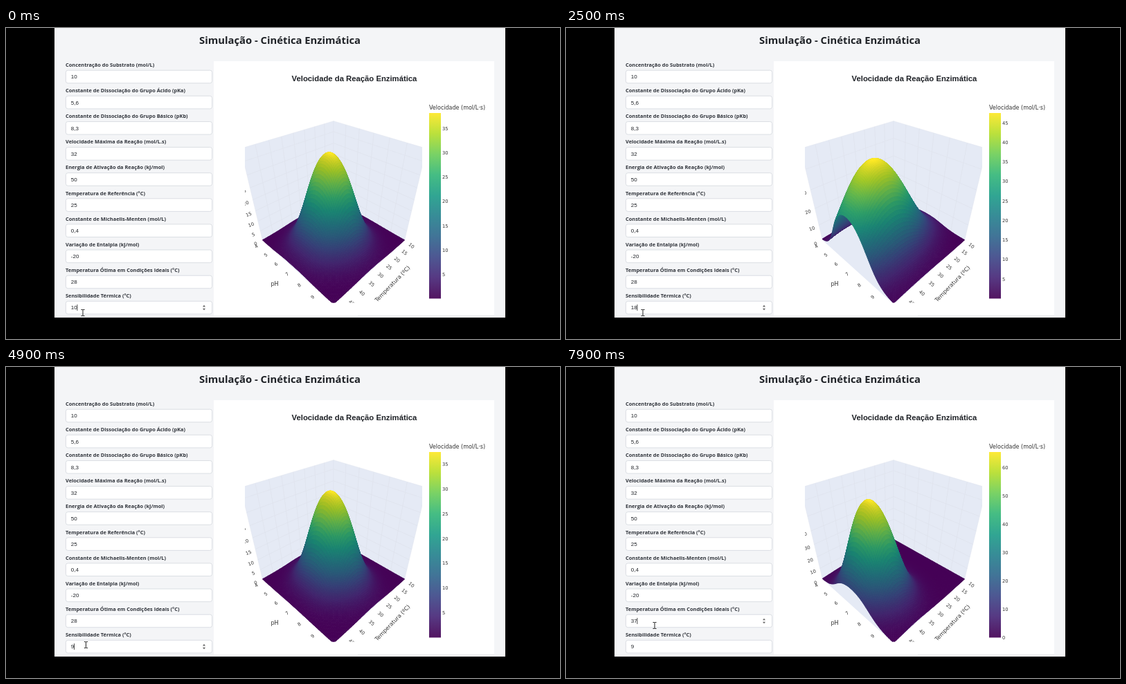
Write an HTML page with a canvas that moves like this. It is 800 by 450 pixels and loops after 8 s.

```html
<!DOCTYPE html>
<html lang="pt">
<head>
<meta charset="utf-8">
<style>
  html, body { margin: 0; width: 100%; height: 100%; overflow: hidden; background: #000; }
  canvas, body > svg { position: absolute; left: 0; top: 0; }
  text { fill: #1f2227; }
  .head { font: bold 14.8px "Open Sans", sans-serif; }
  .label { font: bold 7.4px "Open Sans", sans-serif; fill: #30343b; }
  .value { font: 8px "Liberation Sans", Arial, sans-serif; }
  .title { font: bold 11.3px "Liberation Sans", Arial, sans-serif; }
  .axis { font: 8px "DejaVu Sans", Verdana, sans-serif; fill: #333; }
  .tick { font: 6.7px "DejaVu Sans", Verdana, sans-serif; fill: #333; }
  .mid { text-anchor: middle; }
</style>
</head>
<body>
<canvas id="plot" width="800" height="450"></canvas>
<svg width="800" height="450" viewBox="0 0 800 450">
  <text class="head mid" x="395.5" y="22.5">Simulação - Cinética Enzimática</text>
  <text class="title mid" x="503" y="76.5">Velocidade da Reação Enzimática</text>
  <text class="axis" x="611" y="117.7">Velocidade (mol/L·s)</text>
  <g id="form"></g>
  <g id="barTicks"></g>
  <svg x="345" y="100" width="256" height="297.5" viewBox="345 100 256 297.5">
    <g id="axisTicks"></g>
    <text class="axis mid" x="388" y="373">pH</text>
    <text class="axis mid" transform="translate(560 372) rotate(-46)">Temperatura (ºC)</text>
  </svg>
  <g id="spin" fill="#666"><path d="M284 -1.2l2 -2.6 2 2.6zM284 1.2l2 2.6 2 -2.6z"/></g>
  <path id="caret" stroke="#222" stroke-width=".8" d="M0 -4.5v9"/>
  <path id="pointer" stroke="#222" fill="none" d="M-2.5 -4.5h2l.5 .5 .5 -.5h2M0 -4v8M-2.5 4.5h2l.5 -.5 .5 .5h2"/>
</svg>
<script>
const LOOP = 8000, LAG = 100, N = 90;
const $ = id => document.getElementById(id);
const ctx = $('plot').getContext('2d');
const fields = [
  ['Concentração do Substrato (mol/L)', '10'],
  ['Constante de Dissociação do Grupo Ácido (pKa)', '5,6'],
  ['Constante de Dissociação do Grupo Básico (pKb)', '8,3'],
  ['Velocidade Máxima da Reação (mol/L.s)', '32'],
  ['Energia de Ativação da Reação (kJ/mol)', '50'],
  ['Temperatura de Referência (°C)', '25'],
  ['Constante de Michaelis-Menten (mol/L)', '0,4'],
  ['Variação de Entalpia (kJ/mol)', '-20'],
  ['Temperatura Ótima em Condições Ideais (°C)', '28'],
  ['Sensibilidade Térmica (°C)', '10']
];
const rowY = i => 70.5 + 37.12 * i;
const clamp = (v, a, b) => Math.min(b, Math.max(a, v));
const steps = (t, start, every, count) => clamp(Math.floor((t - start) / every) + 1, 0, count);
const optimum = t => 28 + steps(t, 5950, 187, 9);
const spread = t => 10 + steps(t, 200, 300, 8) - steps(t, 2800, 150, 9);

// Enzyme rate: Arrhenius, thermal bell, Michaelis-Menten and pH ionisation
function rate(pH, temp, opt, width) {
  const inv = 1 / 298.15 - 1 / (temp + 273.15);
  const km = 0.4 * Math.exp(20000 / 8.314 * inv);
  return 32 * Math.exp(50000 / 8.314 * inv - ((temp - opt) / width) ** 2)
    * 10 / (km + 10) / (1 + 10 ** (5.6 - pH) + 10 ** (pH - 8.3));
}

// Perspective view of the unit cube along its diagonal
function project(a, b, z) {
  const depth = 2.165 - (a + b + z) / Math.sqrt(3);
  return [473 + 356 * (a - b) / Math.SQRT2 / depth,
          249.5 - 345 * (2 * z - a - b) / Math.sqrt(6) / depth];
}
const atPH = p => (p - 4) / 6 - 0.5;
const atTemp = t => (t - 10) / 40 - 0.5;
const atRate = f => 0.97 * f - 0.5;

const viridis = ['440154', '482878', '3e4989', '31688e', '26828e', '1f9e89', '35b779', '6ece58', 'b5de2b', 'fde725']
  .map(h => [0, 2, 4].map(i => parseInt(h.slice(i, i + 2), 16)));
function colour(f, light = 1) {
  const x = clamp(f, 0, 1) * 9, i = Math.min(8, Math.floor(x));
  return `rgb(${viridis[i].map((c, k) => Math.round(light * (c + (viridis[i + 1][k] - c) * (x - i))))})`;
}

function shape(points, fill, stroke) {
  ctx.beginPath();
  points.forEach(p => ctx.lineTo(...p));
  ctx.closePath();
  if (fill) { ctx.fillStyle = fill; ctx.fill(); }
  if (stroke) { ctx.strokeStyle = stroke; ctx.stroke(); }
}
function box(x, y, w, h, fill) { ctx.fillStyle = fill; ctx.fillRect(x, y, w, h); }

function drawWalls(max, zStep) {
  const h = 0.5, P = project;
  const line = (p, q) => shape([p, q], null, '#dfe2ec');
  ctx.lineWidth = 0.5;
  shape([P(-h, h, -h), P(-h, h, h), P(-h, -h, h), P(-h, -h, -h)], '#e5eaf5', '#dfe2ec');
  shape([P(h, -h, -h), P(h, -h, h), P(-h, -h, h), P(-h, -h, -h)], '#e5eaf5', '#dfe2ec');
  shape([P(-h, -h, -h), P(h, -h, -h), P(h, h, -h), P(-h, h, -h)], '#e5eaf5');
  for (let p = 5; p < 10; p++) line(P(atPH(p), -h, -h), P(atPH(p), -h, h));
  for (let t = 15; t < 50; t += 5) line(P(-h, atTemp(t), -h), P(-h, atTemp(t), h));
  for (let v = zStep; v < max; v += zStep) {
    const z = atRate(v / max);
    line(P(-h, h, z), P(-h, -h, z));
    line(P(-h, -h, z), P(h, -h, z));
  }
}

function drawSurface(grid, max) {
  const pts = grid.map((row, i) => row.map((v, j) => project(i / N - 0.5, j / N - 0.5, atRate(v / max))));
  ctx.lineWidth = 1;
  for (let i = 0; i < N; i++) for (let j = 0; j < N; j++) {
    const p = grid[i][j], q = grid[i + 1][j], r = grid[i][j + 1], s = grid[i + 1][j + 1];
    const slope = Math.hypot(q + s - p - r, r + s - p - q) * N / 2 / max;
    const c = colour((p + q + r + s) / 4 / max, 0.76 + 0.26 / Math.hypot(1, slope));
    shape([pts[i][j], pts[i + 1][j], pts[i + 1][j + 1], pts[i][j + 1]], c, c);
  }
}

function drawPage() {
  box(0, 0, 800, 450, '#000');
  box(70, 0, 651, 419, '#f4f5f7');
  box(300, 48, 405, 368, '#fff');
  box(508, 416, 197, 1, '#e6e8ec');
  ctx.lineWidth = 0.8;
  fields.forEach((_, i) => {
    ctx.beginPath();
    ctx.roundRect(86.4, rowY(i) - 9.3, 211.2, 18.6, 3);
    ctx.fillStyle = '#fff';
    ctx.fill();
    ctx.strokeStyle = '#d3d7de';
    ctx.stroke();
  });
}

function tickText(text, [x, y], dx, dy, angle) {
  return `<text class="tick mid" transform="translate(${x + dx} ${y + dy}) rotate(${angle})" y="2.4">${text}</text>`;
}

function drawChart(opt, width) {
  const grid = Array.from({ length: N + 1 }, (_, i) =>
    Array.from({ length: N + 1 }, (_, j) => rate(4 + 6 * i / N, 10 + 40 * j / N, opt, width)));
  const max = Math.max(...grid.flat());
  const zStep = max < 40 ? 5 : 10, barStep = max < 50 ? 5 : 10;

  drawPage();
  ctx.save();
  ctx.beginPath();
  ctx.rect(345, 100, 256, 297.5);
  ctx.clip();
  drawWalls(max, zStep);
  drawSurface(grid, max);
  ctx.restore();

  const ramp = ctx.createLinearGradient(0, 391, 0, 123);
  for (let i = 0; i <= 9; i++) ramp.addColorStop(i / 9, colour(i / 9));
  ctx.globalAlpha = 0.92;
  box(611, 123, 17, 268.5, ramp);
  ctx.globalAlpha = 1;

  let bar = '', axes = '';
  for (let v = barStep; v < max; v += barStep)
    bar += `<text class="tick" x="630" y="${393.8 - 268 * v / max}">${v}</text>`;
  if (barStep === 10) bar += '<text class="tick" x="630" y="393.8">0</text>';
  for (let p = 4; p <= 10; p++) axes += tickText(p, project(atPH(p), 0.5, -0.5), -9, 9, -35);
  for (let t = 10; t <= 50; t += 5) axes += tickText(t, project(0.5, atTemp(t), -0.5), 10, 6.7 + 0.13 * t, 40);
  for (let v = 0; v < max; v += zStep) axes += tickText(v, project(-0.5, 0.5, atRate(v / max)), -10, 5, -20);
  $('barTicks').innerHTML = bar;
  $('axisTicks').innerHTML = axes;
}

$('form').innerHTML = fields.map(([label, value], i) =>
  `<text class="label" x="86" y="${rowY(i) - 14.6}">${label}</text>` +
  `<text class="value" x="93.8" y="${rowY(i) + 2.9}">${value}</text>`).join('');
const values = document.querySelectorAll('.value');
const place = (id, x, y) => $(id).setAttribute('transform', `translate(${x} ${y})`);

let shown = '';
function frame(now) {
  const t = now % LOOP, past = Math.max(0, t - LAG);
  const opt = optimum(past), width = spread(past), key = opt + '/' + width;
  if (key !== shown) { drawChart(opt, width); shown = key; }
  values[8].textContent = optimum(t);
  values[9].textContent = spread(t);

  const row = t < 5400 ? 9 : 8;
  place('spin', 0, rowY(row));
  place('caret', values[row].textContent.length > 1 ? 102.9 : 98.5, rowY(row));
  const k = clamp((t - 4700) / 600, 0, 1), ease = k * k * (3 - 2 * k);
  place('pointer', 111 + 17 * ease, 412 - 38 * ease);
  requestAnimationFrame(frame);
}
requestAnimationFrame(frame);
</script>
</body>
</html>
```
